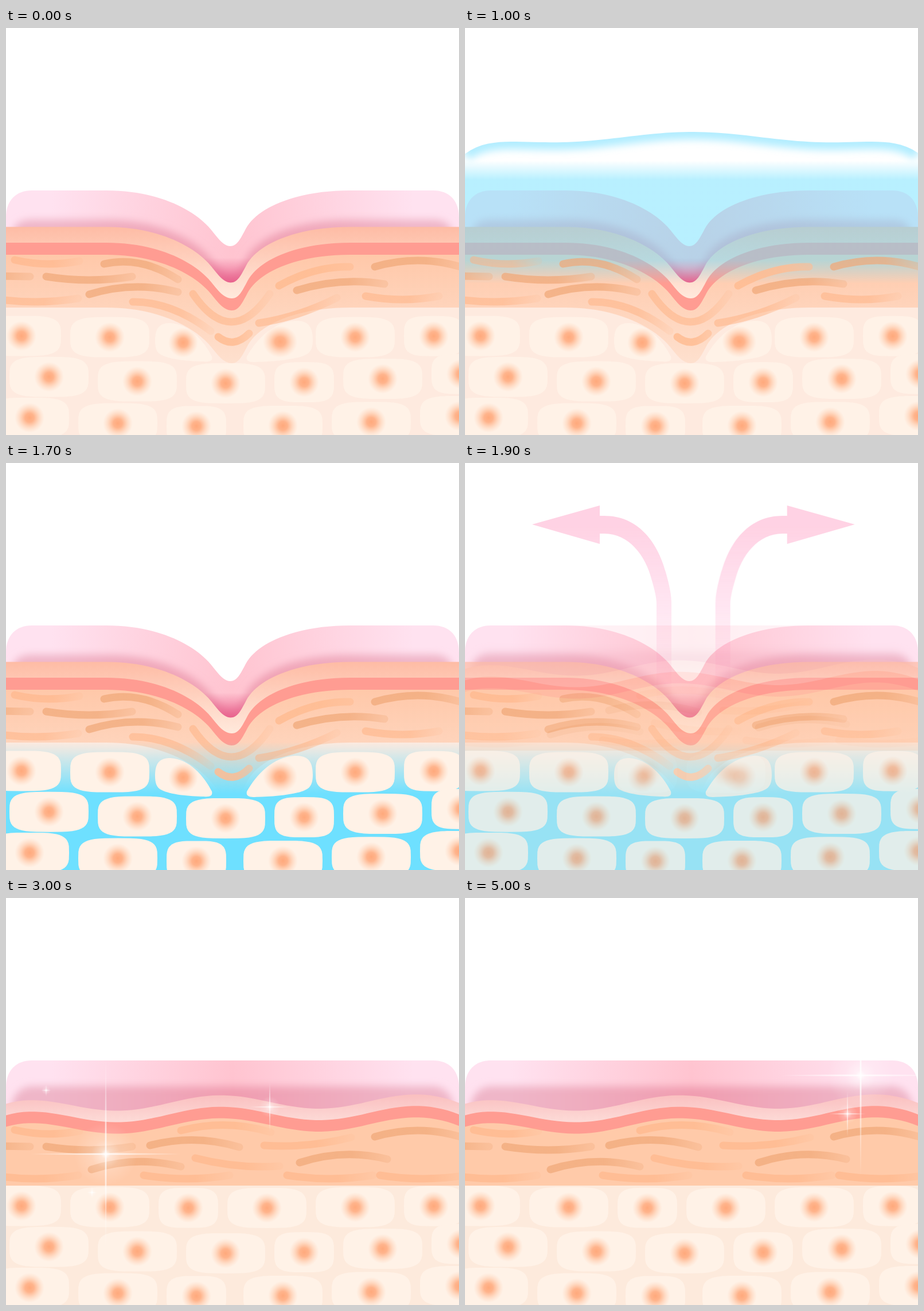
Write an HTML page that moves like this. It is 790x709 px and loops after 5.5 s.

```html
<!DOCTYPE html>
<html lang="en">
<head>
<meta charset="utf-8">
<title>Skin layers</title>
<style>
html, body { margin: 0; width: 100%; height: 100%; overflow: hidden; background: #fff; }
svg { display: block; width: 790px; height: 709px; }
</style>
</head>
<body>
<svg id="stage" viewBox="0 0 790 709" xmlns="http://www.w3.org/2000/svg"></svg>
<script>
const LOOP = 5500, W = 790, H = 709, TAU = Math.PI * 2;
const $ = id => document.getElementById(id);

// Gradients
const stops = list => list.map(([o, c, a = 1]) =>
  `<stop offset="${o}" stop-color="${c}" stop-opacity="${a}"/>`).join('');
const vertical = (id, y1, y2, ...list) =>
  `<linearGradient id="${id}" gradientUnits="userSpaceOnUse" x1="0" x2="0" y1="${y1}" y2="${y2}">${stops(list)}</linearGradient>`;
const mirrored = (id, edge, centre) =>
  `<linearGradient id="${id}" gradientUnits="userSpaceOnUse" x1="0" x2="${W}" y1="0" y2="0">` +
  stops([[.1, edge], [.5, centre], [.9, edge]]) + '</linearGradient>';
const radial = (id, ...list) => `<radialGradient id="${id}">${stops(list)}</radialGradient>`;

// Layer outlines
function graph(f) {
  const pts = [];
  for (let x = 0; x <= W; x += 10) pts.push(`${x} ${f(x).toFixed(1)}`);
  return 'M' + pts.join('L');
}
const fromCentre = x => Math.abs(x - 396) / 395;
const waterTop = x => 190 - 9 * Math.cos(TAU * fromCentre(x) / 1.2) + 33 * fromCentre(x) ** 10;
const ripple = x => 380 - 4 * x / 395 - 12.5 * Math.cos(TAU * (x - 372) / 352) + 10 * fromCentre(x) ** 8;
const rippled = (dy, fill) =>
  `<path d="${graph(x => ripple(x) + dy)}V${H}H0Z" fill="${fill}"/>`;

// Level line with the wrinkle in its middle
const dip = (y, cx) =>
  `H175C260 ${y} 322 ${y + 30} 353 ${y + 63}C368 ${y + 80} 378 ${y + 97} ${cx} ${y + 97}` +
  `C${cx + 12} ${y + 97} ${cx + 18} ${y + 84} ${cx + 27} ${y + 67}C${cx + 48} ${y + 28} 510 ${y} 600 ${y}`;
const fold = (y, cx, fill) =>
  `<path d="M0 ${y}${dip(y, cx)}H${W}V${H}H0Z" fill="${fill}"/>`;
const slab = middle => `M0 500V330C0 300 18 283 45 283${middle}H745C772 283 790 300 790 330V500Z`;

// Fibres: bend is the height of the bow, negative arches upwards
function fibre(tone, x, y, dx = 150, dy = 0, bend = tone === 'dark' ? -11 : 6) {
  return `<path d="M${x} ${y}q${dx / 2} ${dy / 2 + bend * 2} ${dx} ${dy}" fill="none" ` +
    `stroke="url(#${tone})" stroke-width="13" stroke-linecap="round"/>`;
}
const fade = (id, color, from, to) =>
  `<linearGradient id="${id}">${stops([[0, color, from], [.6, color, from], [1, color, to]])}</linearGradient>`;

const sharedFibres = fibre('soft', 15, 404, 113, 2) + fibre('dark', -108, 430, 150, 3, 0) +
  fibre('dark', 70, 433, 150, 0, 6) + fibre('dark', 643, 416) + fibre('soft', 697, 449, 150, 0, 0);
const bentFibres = sharedFibres +
  fibre('dark', 171, 411, 129, 27, -14) + fibre('dark', 145, 464, 155, -4) +
  fibre('soft', -24, 471) + fibre('soft', 221, 477, 136, 51, -13) +
  fibre('soft', 627, 467, 128) + fibre('mid', 476, 449, 124, -33, -9) +
  fibre('dark', 507, 457, 153, -11, -9) + fibre('soft', 441, 514, 136, -44) +
  fibre('soft', 326, 463, 134, 0, 49) + fibre('mid', 370, 538, 54, -6, 12);
const flatFibres = sharedFibres +
  fibre('dark', 149, 473, 156, -5) + fibre('dark', 251, 431, 156, 3) +
  fibre('dark', 512, 461, 153, -6) + fibre('soft', 305, 405, 157, 3, -11) +
  fibre('soft', 330, 453, 147, 14) + fibre('soft', 450, 431, 152, -14) +
  [-24, 240, 490, 652].map(x => fibre('soft', x, 483)).join('');

// Cells
const nucleus = (x, y) => `<circle cx="${x}" cy="${y}" r="26" fill="url(#core)"/>`;
function cell(cx, cy, w) {
  const round = v => Math.sign(v) * Math.abs(v) ** (2 / 3.6);
  let d = '';
  for (let i = 0; i < 48; i++) {
    const a = TAU * i / 48;
    d += `${i ? 'L' : 'M'}${(cx + w / 2 * round(Math.cos(a))).toFixed(1)} ${(cy + 35 * round(Math.sin(a))).toFixed(1)}`;
  }
  return `<path fill="#fff2e7" d="${d}Z"/>` + nucleus(cx, cy);
}
// Lays wide (W) and narrow (N) cells side by side on a slight arch
function cellRow(x, y, arch, kinds) {
  const cells = [];
  for (const kind of kinds) {
    if (kind === ' ') { x += 14; continue; }
    const w = kind === 'W' ? 138 : 104, cx = x + w / 2;
    cells.push(cell(cx, y + arch * Math.sin(Math.PI * cx / W), w));
    x += w + 16;
  }
  return cells;
}
const topRow = cellRow(-42, 536, 4, 'WWNWWN');
const lowRows = cellRow(6, 603, 16, 'WWWNWN').concat(cellRow(-28, 676, 18, 'WWN WWW')).join('');
const wedge = '<path fill="#fff2e7" d="M260 545C260 520 270 514 287 514C320 516 345 545 359 572C361 580 355 582 345 581C320 581 285 577 272 570C262 566 260 556 260 545Z"/>' + nucleus(309, 548);
const bentCells = topRow.filter((c, i) => i < 2 || i > 3).join('') + lowRows +
  wedge + `<g transform="translate(836.6 -40) scale(-1.16 1.07)">${wedge}</g>`;
const flatCells = topRow.join('') + lowRows;

const defs = `<defs>
${fade('dark', '#f0a878', .72, .3)}${fade('mid', '#ffbc92', .85, .6)}${fade('soft', '#ffb080', .5, .12)}
${radial('core', [0, '#ffa97c'], [.3, '#ffad82', .9], [.65, '#ffb890', .4], [1, '#ffc8a8', 0])}
${radial('glow', [0, '#fff', .95], [.15, '#fff', .5], [.45, '#fff', .2], [1, '#fff', 0])}
${radial('beam', [0, '#fff'], [.4, '#fff', .6], [1, '#fff', 0])}
${mirrored('pink', '#ffe2f0', '#ffc4d0')}
${mirrored('shade', '#efb6c8', '#f09db0')}
${vertical('deep', 400, 443, [0, '#e8608c', 0], [1, '#e8608c', .95])}
${vertical('bentTop', 347, 470, [0, '#febca5'], [1, '#ffe9dc'])}
${vertical('bentMid', 395, 583, [0, '#ffc8a9'], [1, '#fee0ce'])}
${vertical('flatTop', 342, 392, [0, '#fabfbf'], [1, '#fddcd8'])}
${vertical('arrow', 110, 425, [0, '#ff619e'], [.45, '#ff6db2', .6], [1, '#ff7aae', 0])}
${vertical('tint', 0, H, ...Array(4).fill([0, '#6ee0ff', 0]))}
<filter id="blur" x="-10%" y="-50%" width="120%" height="200%"><feGaussianBlur stdDeviation="7"/></filter>
<clipPath id="bentClip"><path d="${slab(dip(283, 391))}"/></clipPath>
<clipPath id="flatClip"><path d="${slab('')}"/></clipPath>
<clipPath id="waterClip"><path d="${graph(waterTop)}V${H}H0Z"/></clipPath>
</defs>`;

const bent = `<g id="bent">
<g clip-path="url(#bentClip)">
  <rect y="280" width="${W}" height="220" fill="url(#pink)"/>
  <path d="M12 600V358Q14 334 46 334${dip(334, 392)}H744Q776 334 778 358V600Z" fill="url(#shade)" filter="url(#blur)"/>
  <rect x="340" y="400" width="110" height="50" fill="url(#deep)"/>
</g>
${fold(346.5, 392, 'url(#bentTop)')}
${fold(374, 394, '#ff9c92')}
${fold(395, 394, 'url(#bentMid)')}
${fold(487, 394, '#feeadf')}
<g clip-path="url(#waterClip)">
  <path id="rim" d="${graph(waterTop)}" fill="none" stroke="#7fe2ff" stroke-opacity=".6" stroke-width="26" filter="url(#blur)"/>
  <rect id="water" width="${W}" height="${H}" fill="url(#tint)"/>
</g>
${bentFibres}
<g id="bentCells">${bentCells}</g>
</g>`;

const flat = `<g id="flat">
<g clip-path="url(#flatClip)">
  <rect y="280" width="${W}" height="120" fill="url(#pink)"/>
  <rect x="10" y="328" width="770" height="150" rx="36" fill="url(#shade)" filter="url(#blur)"/>
</g>
${rippled(-20, 'url(#flatTop)')}${rippled(0, '#ff9c92')}${rippled(20, '#ffcaa9')}
<rect y="501" width="${W}" height="208" fill="#fdeadc"/>
${flatFibres}${flatCells}
</g>`;

const arrow = '<path fill="url(#arrow)" d="M117 107L235 74V92H243C300 92 335 135 350 190C357 215 360 230 360 245V425H334V245C334 235 331 222 326 205C315 160 285 123 243 123H235V141Z"/>';
const arrows = `<g id="arrows">${arrow}<g transform="translate(796.7 0) scale(-1 1)">${arrow}</g></g>`;

const marks = [-1, 0, 1].map(side =>
  `<path class="mark" transform="translate(${385 + 36.5 * side} ${282 + 7 * Math.abs(side)}) rotate(${25 * side})" ` +
  'fill="#ff7fa8" d="M-8 -17C-8 -26.5 8 -26.5 8 -17L2.5 22C2 24.6 -2 24.6 -2.5 22Z"/>').join('');

const spark = (x, y, size) => {
  const thin = .8 + size / 140;
  return `<g transform="translate(${x} ${y})" fill="url(#beam)"><circle r="${4 + size * .3}" fill="url(#glow)"/>` +
    `<ellipse rx="${size * .8}" ry="${thin}"/><ellipse rx="${thin}" ry="${size}"/></g>`;
};
const rightSparks = spark(690, 309, 180) + spark(667, 376, 45);
const sparkSets = [
  spark(174, 446, 170) + spark(460, 364, 48) + spark(70, 335, 13) + spark(150, 513, 13),
  '',
  rightSparks + spark(118, 390, 36),
  spark(200, 345, 58),
  rightSparks
];

$('stage').innerHTML = defs + bent + flat + arrows + marks +
  sparkSets.map(art => `<g class="sparks">${art}</g>`).join('');

const show = (el, on) => { el.style.display = on ? '' : 'none'; };
const [bentG, bentCellsG, flatG, arrowsG, rim, water] =
  ['bent', 'bentCells', 'flat', 'arrows', 'rim', 'water'].map($);
const tintStops = [...$('tint').children];
const markEls = [...document.querySelectorAll('.mark')];
const sparkEls = [...document.querySelectorAll('.sparks')];

// The water sinks in visible steps
const SINK = [800, 1000, 1200, 1300, 1500, 1700];
function drawWater(t) {
  const now = SINK.filter(s => s <= t).pop();
  show(water, now);
  show(rim, now && now < 1700);
  if (!now) return;
  const q = (now - 800) / 900;
  const top = 229 + 302 * q ** 1.85, topSoft = 15 + 30 * q * q;
  const bottom = 380 + 192 * (1 - Math.cos(Math.PI * q)), alpha = .43 + .57 * q ** 1.5;
  [top - topSoft, top + topSoft, bottom - 20, bottom + 20].forEach((y, i) => {
    tintStops[i].setAttribute('offset', y / H);
    tintStops[i].setAttribute('stop-opacity', i % 3 ? alpha : 0);
  });
}

function draw(t) {
  drawWater(t);
  markEls.forEach((el, i) => show(el, t >= 200 * (i + 1) && t < 800));

  const step = Math.floor(t / 100) * 100;
  const mix = t < 1900 ? 0 : Math.min(1, (step - 1700) / 700);
  show(bentG, mix < 1);
  bentCellsG.setAttribute('opacity', 1 - mix);
  show(flatG, mix > 0);
  flatG.setAttribute('opacity', mix);
  show(arrowsG, mix > 0 && t < 3000);
  arrowsG.setAttribute('opacity', mix);

  const set = Math.floor((t - 3000) / 500);
  sparkEls.forEach((el, i) => show(el, i === set));
}

const begin = performance.now();
function tick() {
  draw((performance.now() - begin) % LOOP);
  requestAnimationFrame(tick);
}
tick();
</script>
</body>
</html>
```
